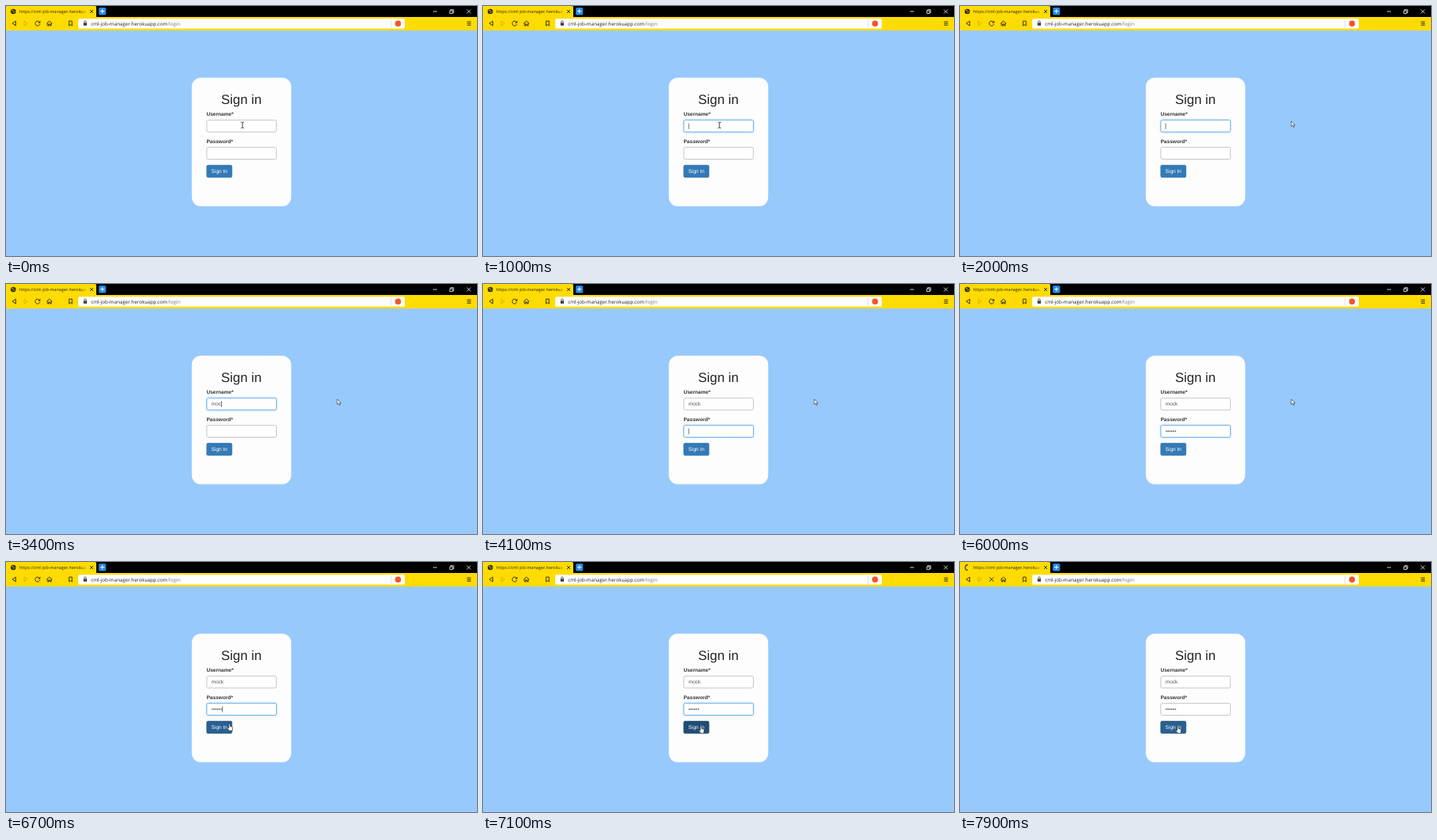
These frames come from a looping animation (600x319 px, 8000 ms). An HTML page:

```html
<!DOCTYPE html>
<html lang="en">
<head>
<meta charset="utf-8">
<title>Sign in</title>
<style>
  html, body { margin: 0; width: 100%; height: 100%; overflow: hidden; background: #97c9fd; }
  svg { display: block; width: 100%; height: 100%; }
  text { font: 6.56px "Liberation Sans", Arial, sans-serif; text-rendering: geometricPrecision; white-space: pre; }
  .chrome { font-family: "Open Sans", "Noto Sans", sans-serif; }
  .label { font-weight: bold; fill: #333; }
  .value { fill: #555; }
  .line { fill: none; stroke: #2b2500; stroke-width: .9; }
</style>
</head>
<body>
<svg viewBox="0 0 600 319" preserveAspectRatio="none">
  <defs>
    <filter id="blur" x="-20%" y="-80%" width="140%" height="260%">
      <feGaussianBlur stdDeviation="1.6"/>
    </filter>
    <linearGradient id="fade" gradientUnits="userSpaceOnUse" x1="96" x2="103.5">
      <stop stop-color="#2b2500"/>
      <stop offset="1" stop-color="#2b2500" stop-opacity="0"/>
    </linearGradient>
  </defs>

  <rect width="600" height="319" fill="#97c9fd"/>

  <!-- tab strip -->
  <rect width="600" height="14" fill="#000"/>
  <path d="M0 0H113.5Q115 0 115 1.5V14H0Z" fill="#fedb02"/>
  <g id="globe">
    <circle cx="9.3" cy="7" r="3.3" fill="#2b2500"/>
    <path d="M7.1 5.8L8.7 5.1L9.4 6.1L8.3 7.3M9.6 8.9L10.2 7.4L11.6 7.2" fill="none" stroke="#fedb02" stroke-width=".8"/>
  </g>
  <path id="spinner" class="line" d="M10 3.6A3.4 3.4 0 0 0 10 10.4" style="stroke-width:1.1"/>
  <text class="chrome" x="17" y="9" style="font-size:5.48px" fill="url(#fade)">https://cml-job-manager.herokua</text>
  <path class="line" d="M107 5L111 9M111 5L107 9"/>
  <rect x="118.2" y="2" width="9.2" height="9.4" rx="1.5" fill="#2488ea"/>
  <path d="M122.8 4V9.4M120.1 6.7H125.5" stroke="#fff" stroke-width="1"/>
  <g fill="none" stroke="#fff" stroke-width=".8">
    <path d="M544 7H549M587 4.5L592 9.5M592 4.5L587 9.5"/>
    <path d="M565.4 6H569V9.6H565.4ZM566.5 6V4.7H570.2V8.5H569"/>
  </g>

  <!-- toolbar -->
  <rect y="14" width="600" height="17.3" fill="#fedb02"/>
  <path class="line" d="M12.4 19.3V25.1L8 22.2Z"/>
  <path class="line" d="M23.2 19.3V25.1L27.4 22.2Z" opacity=".22"/>
  <g id="reload">
    <path class="line" d="M42.7 20.6A3 3 0 1 0 43.1 23"/>
    <path d="M43.6 18.8V21.7H40.7Z" fill="#2b2500"/>
  </g>
  <path id="stop" class="line" d="M37.4 19.4L43 25M43 19.4L37.4 25"/>
  <path class="line" d="M51.8 22.3L55.3 19.2L58.8 22.3M52.9 21.5V25.1H54.5V23H56.1V25.1H57.7V21.5"/>
  <path class="line" d="M80.3 19.2H84.1V25.3L82.2 23.6L80.3 25.3Z"/>
  <rect x="92" y="16.3" width="416" height="12.5" rx="1.6" fill="#fff"/>
  <rect x="98.7" y="21.3" width="4.4" height="3.7" rx=".5" fill="#444"/>
  <path d="M99.6 21.5V20.2A1.3 1.3 0 0 1 102.2 20.2V21.5" fill="none" stroke="#444" stroke-width=".8"/>
  <text class="chrome" x="108.3" y="24.5" style="font-size:6.25px" fill="#222">cml-job-manager.herokuapp.com<tspan fill="#777">/login</tspan></text>
  <path d="M490.5 17.5V27.8" stroke="#d5d5d5" stroke-width=".7"/>
  <circle cx="499.4" cy="22.4" r="3.8" fill="#f4562a"/>
  <path class="line" d="M587.3 20.2H592.3M587.3 22.3H592.3M587.3 24.4H592.3"/>

  <!-- sign-in card -->
  <rect x="236.7" y="91.4" width="126.6" height="164.2" rx="11.5" fill="#fdfdfd"/>
  <text x="274" y="125.2" style="font-size:16.9px" fill="#222">Sign in</text>
  <text class="label" x="255.5" y="140.3">Username*</text>
  <text class="label" x="255.5" y="175.1">Password*</text>
  <g id="fields"></g>
  <rect id="button" x="255.7" y="203.1" width="32.2" height="15.6" rx="1.7" stroke-width=".6"/>
  <text x="261.6" y="213.3" fill="#fff">Sign In</text>

  <!-- pointers, hot spot at 0,0 -->
  <path id="beam" d="M-2 -3.8Q-.3 -3.8 0 -3Q.3 -3.8 2 -3.8M0 -3V3M-2 3.8Q-.3 3.8 0 3Q.3 3.8 2 3.8" fill="none" stroke="#111" stroke-width=".8"/>
  <path id="arrow" d="M0 0V6.6L1.6 5.2L2.7 7.6L3.8 7.1L2.7 4.8H4.9Z" fill="#fff" stroke="#222" stroke-width=".6"/>
  <path id="hand" d="M-.9 .4Q0 -.5 .8 .4V3.2L3 3.7Q4 4 3.9 5L3.4 8.8H-.4L-2.8 5.6Q-2.6 4.5 -.9 5.5Z" fill="#fff" stroke="#222" stroke-width=".6"/>
</svg>
<script>
const LOOP = 8000, STEP = 100, BLINK = 500, FADE = 150;
const $ = id => document.getElementById(id);
const clamp = v => Math.max(0, Math.min(1, v));
const ease = v => v * v * (3 - 2 * v);
const show = (id, on) => $(id).setAttribute('visibility', on ? 'visible' : 'hidden');

function add(parent, name, attrs) {
  const node = document.createElementNS('http://www.w3.org/2000/svg', name);
  for (const key in attrs) node.setAttribute(key, attrs[key]);
  return parent.appendChild(node);
}

function makeField(y, value, focus, blur, keys) {
  const box = { x: 255.8, y, width: 88.6, height: 15.2, rx: 1.8 };
  const g = $('fields');
  return {
    value, focus, blur, keys,
    glow: add(g, 'rect', { ...box, fill: '#66afe9', filter: 'url(#blur)' }),
    frame: add(g, 'rect', { ...box, fill: '#fff', 'stroke-width': .8 }),
    text: add(g, 'text', { class: 'value', x: 261.7, y: y + 9.8 }),
    caret: add(g, 'rect', { y: y + 4, width: .7, height: 7.4, fill: '#333' })
  };
}

const fields = [
  makeField(145.6, 'mock', 800, 3950, [2300, 2700, 3100, 3500]),
  makeField(180.3, '••••••', 3950, 7150, [4500, 4700, 4900, 5200, 5300, 5500])
];

function mix(a, b, k) {
  return `rgb(${a.map((v, i) => Math.round(v + (b[i] - v) * k))})`;
}

function drawField(f, t) {
  const lit = clamp((t - f.focus) / FADE) - clamp((t - f.blur) / FADE);
  f.glow.setAttribute('opacity', .75 * lit);
  f.frame.setAttribute('stroke', mix([184, 184, 184], [86, 164, 228], lit));

  const typed = f.keys.filter(k => k <= t);
  f.text.textContent = f.value.slice(0, typed.length);
  const since = t - (typed.length ? typed[typed.length - 1] : f.focus);
  const on = t >= f.focus && t < f.blur && Math.floor(since / BLINK) % 2 === 0;
  const width = typed.length ? f.text.getComputedTextLength() : 0;
  f.caret.setAttribute('x', 261.7 + width);
  f.caret.setAttribute('visibility', on ? 'visible' : 'hidden');
}

function pointerAt(t) {
  const out = ease(clamp((t - 1000) / 750));
  const back = ease(clamp((t - 6050) / 750));
  return [
    301.2 + 120.8 * out - 144.2 * back,
    152 - 5 * out + 62.6 * back
  ];
}

function drawPointer(x, y, overButton) {
  const overField = x > 255 && x < 345 && [145, 180].some(top => y > top && y < top + 16);
  const kind = overButton ? 'hand' : overField ? 'beam' : 'arrow';
  for (const id of ['beam', 'arrow', 'hand']) show(id, id === kind);
  $(kind).setAttribute('transform', `translate(${x} ${y})`);
}

function draw(t) {
  fields.forEach(f => drawField(f, t));

  const [x, y] = pointerAt(t);
  const over = x > 255.5 && x < 288 && y > 203 && y < 219;
  drawPointer(x, y, over);

  const pressed = t >= 7050 && t < 7300;
  const [fill, edge] = pressed ? ['#204d74', '#1b4468'] : over ? ['#286090', '#204d74'] : ['#337ab7', '#2e6da4'];
  $('button').setAttribute('fill', fill);
  $('button').setAttribute('stroke', edge);

  const loading = t >= 7400;
  show('globe', !loading);
  show('reload', !loading);
  show('spinner', loading);
  show('stop', loading);
  $('spinner').setAttribute('transform', `rotate(${(t - 7900) * .36} 10 7)`);
}

function tick(now) {
  draw(Math.floor(now % LOOP / STEP) * STEP);
  requestAnimationFrame(tick);
}
draw(0);
requestAnimationFrame(tick);
</script>
</body>
</html>
```
